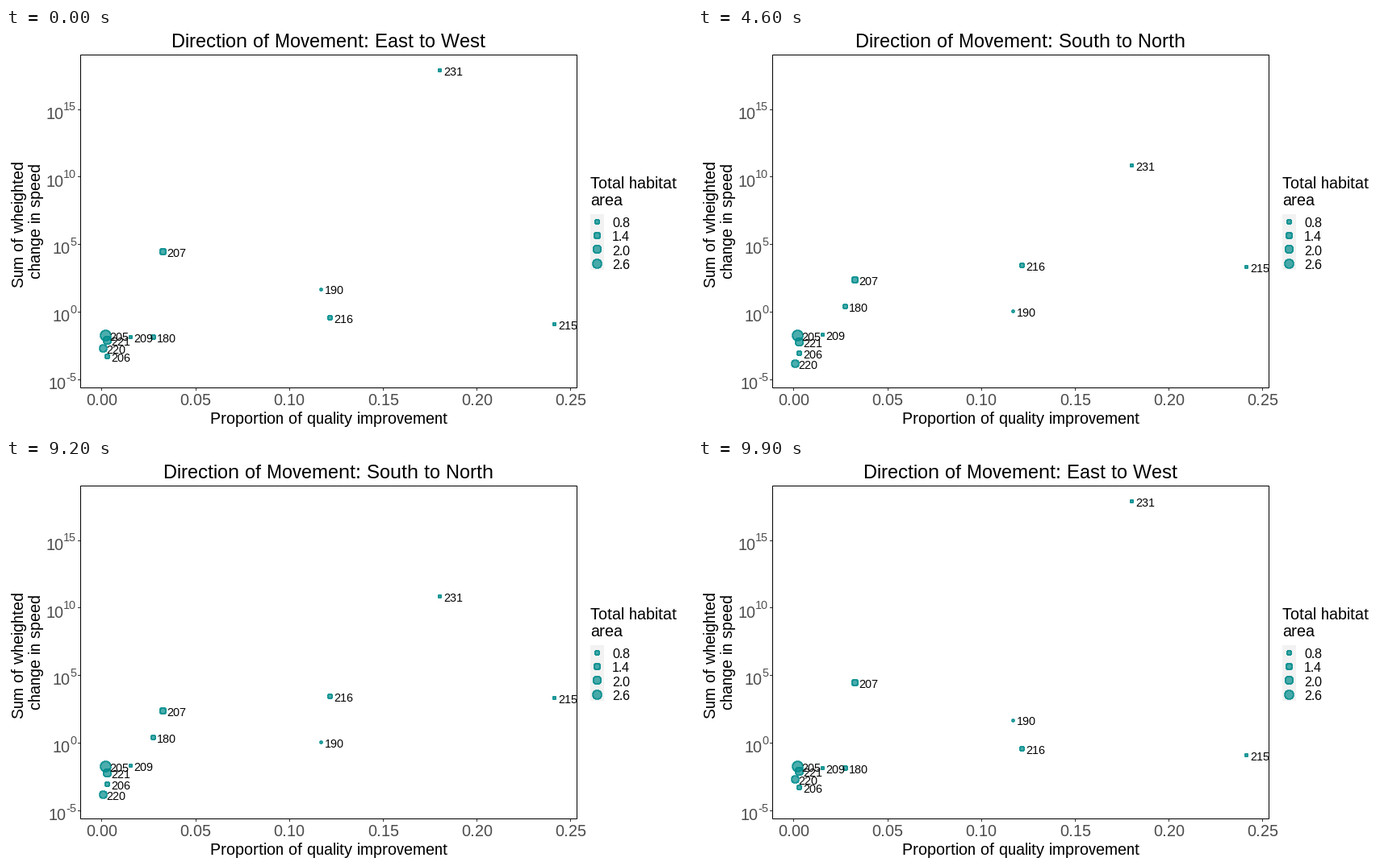
Recreate the animation shown at these times as a matplotlib script. Size 850 by 500 pixels, loop 10000 ms.

```python
from math import floor

import matplotlib.pyplot as plt
from matplotlib.animation import FuncAnimation
from matplotlib.patches import Circle, Rectangle

W, H, DPI = 850, 500, 100
PX = 72 / DPI                      # points per pixel
STEPS, SWITCH = 11, 7              # length of a move, step at which the title flips
TEAL = (0, 139 / 255, 139 / 255, 0.7)
GREY = "#4D4D4D"
TITLES = ("East to West", "South to North")

# label, x, y when east-west, y when south-north, radius (pixels)
POINTS = [
    ("205", 123.7, 381, 381, 6.5),
    ("221", 125.6, 387.6, 390.8, 5),
    ("220", 120.1, 397.2, 428.2, 4.5),
    ("206", 125.6, 407.8, 400.8, 3),
    ("209", 154.2, 383.2, 378.2, 2),
    ("180", 182.2, 383.2, 324.2, 3),
    ("207", 194.6, 277.8, 331.6, 4),
    ("190", 390.2, 324, 367.2, 1.5),
    ("216", 401.7, 359.7, 256.7, 3),
    ("231", 537.5, 52.6, 238.6, 2),
    ("215", 679.6, 367.6, 256.6, 2),
]

# whole-pixel glyph hinting, as on a plain bitmap device
plt.rcParams.update({
    "font.family": "Liberation Sans",
    "text.hinting": "native",
    "text.hinting_factor": 1,
})
fig = plt.figure(figsize=(W / DPI, H / DPI), dpi=DPI, facecolor="white")
ax = fig.add_axes([0, 0, 1, 1])
ax.set_xlim(0, W)
ax.set_ylim(H, 0)
ax.axis("off")


def mid(v):
    """Centre of the pixel that holds v."""
    return floor(v) + 0.5


def text(x, y, s, size, color="black", ha="left", **kw):
    return ax.text(x, y, s, fontsize=size * PX, color=color, ha=ha,
                   va="baseline", **kw)


def line(xs, ys):
    ax.plot(xs, ys, color="#333333", lw=PX, solid_capstyle="butt", snap=False)


def dot(x, y, r):
    return ax.add_patch(Circle((mid(x), mid(y)), r, facecolor=TEAL,
                               edgecolor=TEAL, lw=PX, antialiased=False))


def power_label(y, exponent):
    digits = exponent.lstrip("-")
    width = 14 * (0.556 * len(digits) + 0.333 * (len(exponent) - len(digits)))
    text(87.3 - width, y + 12, "10", 20, GREY, "right")
    text(87.3, y + 1.5, exponent, 14, GREY, "right")


def draw_axes():
    for i in range(6):
        x = 118.8 + 116.2 * i
        line([mid(x)] * 2, [447, 450])
        text(x, 468, f"{0.05 * i:.2f}", 20, GREY, "center")
    for i, exponent in enumerate(("15", "10", "5", "0", "-5")):
        y = 101 + 83.75 * i
        line([89, 92], [mid(y)] * 2)
        power_label(y, exponent)
    text(400, 491, "Proportion of quality improvement", 20, ha="center")
    side = dict(ha="center", rotation=90, rotation_mode="anchor")
    text(22, 243, "Sum of wheighted", 20, **side)
    text(43.5, 239.5, "change in speed", 20, **side)


def draw_legend():
    text(724, 199, "Total habitat", 20)
    text(724, 220, "area", 20)
    ax.add_patch(Rectangle((724, 231), 17, 69, facecolor="#F2F2F2", lw=0))
    for i, r in enumerate((3, 4, 5, 5.5)):
        dot(732.5, 240.2 + 17.3 * i, r)
        text(751, 247 + 17.3 * i, f"{0.8 + 0.6 * i:.1f}", 16)


draw_axes()
draw_legend()
title = text(399.5, 24, "", 24, ha="center")

panel = Rectangle((92.5, 33.5), 615, 413, fill=False, edgecolor="black",
                  lw=PX, joinstyle="miter", snap=False, zorder=6)
ax.add_patch(panel)
dots = [dot(x, y, r) for _, x, y, _, r in POINTS]
labels = [text(x + 4.4, y + 6.5, s, 14) for s, x, y, _, _ in POINTS]
for item in dots + labels:
    item.set_clip_path(panel)


def state(frame):
    """Return the blend between both layouts and the title index."""
    if frame < 89:
        step = min(max(frame - 39, 0), STEPS)
        return step / STEPS, int(step >= SWITCH)
    step = frame - 88
    return 1 - step / STEPS, int(step < SWITCH)


def update(frame):
    blend, side = state(frame)
    title.set_text("Direction of Movement: " + TITLES[side])
    for (_, x, y0, y1, _), mark, label in zip(POINTS, dots, labels):
        y = y0 + (y1 - y0) * blend
        mark.center = (mid(x), mid(y))
        label.set_y(y + 6.5)
    return [title, *dots, *labels]


anim = FuncAnimation(fig, update, frames=100, interval=100, repeat=True,
                     repeat_delay=0, init_func=lambda: update(0))
plt.show()
```
